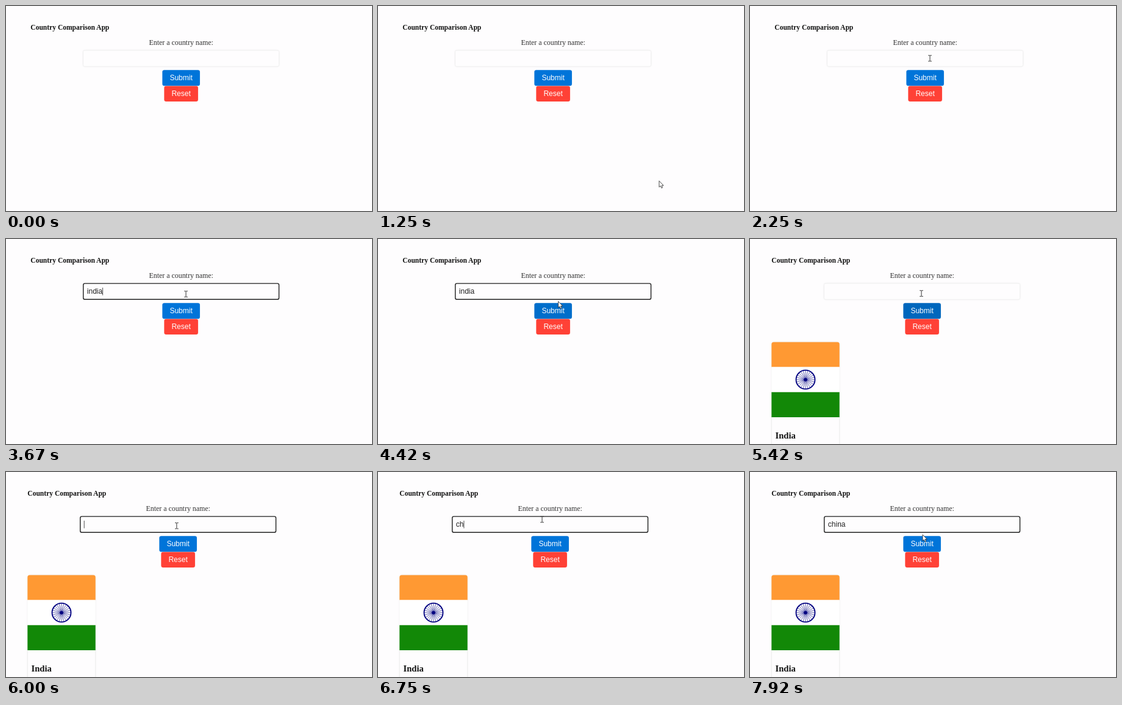
An HTML page for the animation above (8 s loop, 600 by 337 pixels).

```html
<!DOCTYPE html>
<html lang="en">
<head>
<meta charset="utf-8">
<title>Country Comparison App</title>
<style>
html, body { margin: 0; width: 100%; height: 100%; overflow: hidden; background: #fefdfe; }
svg { display: block; width: 600px; height: 337px; }
.serif { font-family: "Liberation Serif", serif; }
.sans { font: 12px "Liberation Sans", sans-serif; }
.bold { font-weight: bold; fill: #111; }
.mid { text-anchor: middle; }
.soft { fill: #fefdfe; stroke: #f0f0f0; filter: drop-shadow(0 0 1px #0001); }
.outline { fill: none; stroke: #222; stroke-width: 1.4; }
.pointer { fill: #fff; stroke: #222; stroke-width: .8; stroke-linejoin: round; }
</style>
</head>
<body>
<svg viewBox="0 0 600 337">
  <g id="form">
    <text class="serif bold" x="40.3" y="38.9" font-size="11.55">Country Comparison App</text>
    <text class="serif mid" x="287.2" y="64.1" font-size="11.9" fill="#333">Enter a country name:</text>
    <rect class="soft" x="126.5" y="73" width="321" height="26.3" rx="2.5"/>
    <rect id="focus" class="outline" x="126.7" y="73.1" width="320.8" height="26.2" rx="2.5"/>
    <text id="field" class="sans" x="132.8" y="90" fill="#222"></text>
    <path id="caret" d="M0 80v12.5" stroke="#222" stroke-width=".8"/>
    <rect id="submit" x="256.3" y="105.3" width="61.6" height="25.9" rx="3.3"/>
    <rect x="259.3" y="131.4" width="55.6" height="25.6" rx="3.3" fill="#ff4136"/>
    <g class="sans mid" fill="#fff">
      <text x="287.1" y="122.1">Submit</text>
      <text x="287.1" y="148.1">Reset</text>
    </g>
  </g>
  <g id="card">
    <rect class="soft" x="35.5" y="169.5" width="111" height="190" rx="4"/>
    <g id="flag">
      <path d="M35.3 210.5V173q0-3.5 3.5-3.5h104.4q3.5 0 3.5 3.5v37.5z" fill="#f93"/>
      <path d="M35.3 210.5h111.4v41.2H35.3z" fill="#fff"/>
      <path d="M35.3 251.7h111.4v41.2H35.3z" fill="#128807"/>
      <g transform="translate(91 231.2)" stroke="#000080">
        <circle r="15.5" fill="none" stroke-width="1.8"/>
        <path id="spokes" stroke-width=".6"/>
        <circle r="2.8" fill="#000080" stroke="none"/>
      </g>
    </g>
    <text class="serif bold" x="41.5" y="327.6" font-size="14.6">India</text>
  </g>
  <g id="cursor">
    <path id="arrow" class="pointer" d="M0 0V10.2L2.3 8.2 3.9 11.8 5.6 11 4.1 7.6H7.2Z"/>
    <path id="beam" d="M-2.8-4.8H-.7L0-4.3 .7-4.8H2.8M0-4.3V4.3M-2.8 4.8H-.7L0 4.3 .7 4.8H2.8" fill="none" stroke="#333"/>
    <path id="hand" class="pointer" transform="translate(-.6) scale(1.12)" d="M-1 .8Q0-.8 1 .8V4.8L4.6 5.6Q6 6 5.8 7.6L4.9 13.2H-.3L-3.6 8.8Q-3.4 7-1 8.4Z"/>
  </g>
</svg>
<script>
const LOOP = 8000, STEP = 1000 / 12;
const LOAD = 4990, FLAG = 5160;

// Cursor glides: start time, end time, destination
const glides = [
  { from: 1160, to: 1750, x: 295, y: 86 },
  { from: 2250, to: 2750, x: 295, y: 90.5 },
  { from: 4080, to: 4750, x: 296, y: 114.5 },
  { from: 5000, to: 5420, x: 281, y: 89.5 },
  { from: 5900, to: 6420, x: 269, y: 78 },
  { from: 7500, to: 7917, x: 283, y: 103 }
];
const sessions = [
  { word: "india", focus: 2410, blur: 4575, clear: LOAD, start: 2910, gap: 166 },
  { word: "china", focus: 5995, blur: LOOP, clear: LOOP, start: 6410, gap: 187 }
];

const $ = id => document.getElementById(id);
const show = (id, on) => $(id).setAttribute("visibility", on ? "inherit" : "hidden");
const move = (id, x, y = 0) => $(id).setAttribute("transform", `translate(${x} ${y})`);
const ramp = (t, from, to) => Math.min(1, Math.max(0, (t - from) / (to - from)));
const smooth = p => p * p * (3 - 2 * p);

function drawField(t) {
  const s = sessions.find(s => t >= s.focus && t < s.clear);
  const count = s ? Math.min(s.word.length, Math.max(0, Math.floor((t - s.start) / s.gap) + 1)) : 0;
  $("field").textContent = s ? s.word.slice(0, count) : "";

  const focused = !!s && t < s.blur;
  const lastInput = s && (count ? s.start + (count - 1) * s.gap : s.focus);
  show("focus", focused);
  show("caret", focused && (t - lastInput) % 1000 < 500);
  move("caret", 133.2 + $("field").getComputedTextLength());
}

function drawCursor(t) {
  let x = 472, y = 301;
  for (const g of glides) {
    const p = smooth(ramp(t, g.from, g.to));
    x += (g.x - x) * p;
    y += (g.y - y) * p;
  }
  const overButton = y > 105 && y < 157 && x > 251 && x < 318;
  const kind = y < 100 ? "beam" : overButton ? "hand" : "arrow";
  for (const id of ["arrow", "beam", "hand"]) show(id, id === kind);
  show("cursor", t >= 995);
  move("cursor", x, y);
}

function draw(t) {
  const loaded = t >= LOAD;
  move("form", loaded ? -5 : 0);
  show("card", loaded);
  show("flag", t >= FLAG);
  const hover = ramp(t, 4330, 4630) - ramp(t, 5290, 5590);
  $("submit").setAttribute("fill", `rgb(0 ${116 - 22 * hover} ${217 - 49 * hover})`);
  drawField(t);
  drawCursor(t);
}

let spokes = "";
for (let i = 0; i < 24; i++) {
  const a = i * Math.PI / 12;
  spokes += `M0 0L${15 * Math.cos(a)} ${15 * Math.sin(a)}`;
}
$("spokes").setAttribute("d", spokes);

function tick() {
  const t = performance.now() % LOOP;
  draw(Math.floor((t + 4) / STEP) * STEP);
  requestAnimationFrame(tick);
}
tick();
</script>
</body>
</html>
```
